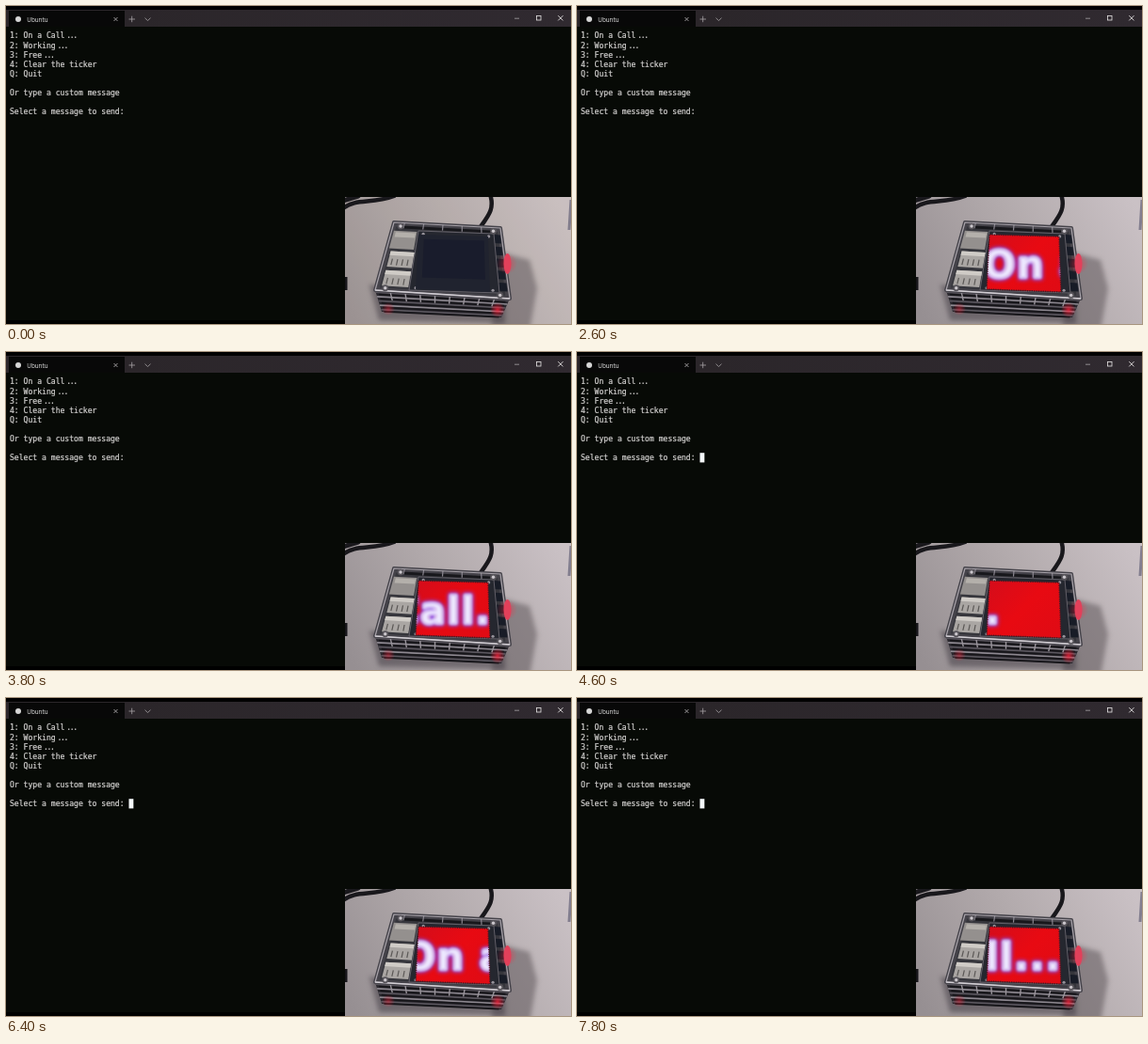
Animation of 600x338 px, one loop 8000 ms. Source, as an HTML page with a canvas:

```html
<!DOCTYPE html>
<html lang="en">
<head>
<meta charset="utf-8">
<title>Status ticker</title>
<style>
html, body { margin: 0; width: 100%; height: 100%; overflow: hidden; background: #000; }
canvas { display: block; width: 600px; height: 338px; }
</style>
</head>
<body>
<canvas id="stage" width="600" height="338"></canvas>
<script>
const ctx = document.getElementById('stage').getContext('2d');
const LOOP = 8000, STEP = 200;
const TYPED = 1400, SENT = 1800;
const LEFT = 4, CELL = 4.865, ROW = 10.13, BASE = 34.4;
const MENU = ['1: On a Call...', '2: Working...', '3: Free...', '4: Clear the ticker', 'Q: Quit',
  '', 'Or type a custom message', '', 'Select a message to send:'];
const TICKER = { text: 'On a Call...', from: 530, speed: 0.123, period: 3721, base: 288.5 };

const mix = (a, b, k) => a + (b - a) * k;

function rect(x, y, w, h, fill) {
  ctx.fillStyle = fill;
  ctx.fillRect(x, y, w, h);
}

function trace(points, close) {
  ctx.beginPath();
  points.forEach(p => ctx.lineTo(...p));
  if (close) ctx.closePath();
}

function poly(points, fill) {
  trace(points, true);
  ctx.fillStyle = fill;
  ctx.fill();
}

function stroke(points, color, width = 1, close = false) {
  trace(points, close);
  ctx.strokeStyle = color;
  ctx.lineWidth = width;
  ctx.stroke();
}

function disc([x, y], r, fill) {
  ctx.beginPath();
  ctx.arc(x, y, r, 0, 7);
  ctx.fillStyle = fill;
  ctx.fill();
}

function cross(x, y, r, color) {
  for (const s of [-1, 1]) stroke([[x - r, y - r * s], [x + r, y + r * s]], color, 0.9);
}

function blend(x0, y0, x1, y1, ...colors) {
  const g = ctx.createLinearGradient(x0, y0, x1, y1);
  colors.forEach((c, i) => g.addColorStop(i / (colors.length - 1), c));
  return g;
}

function glow(x, y, r, alpha) {
  const g = ctx.createRadialGradient(x, y, 0, x, y, r);
  g.addColorStop(0, `rgba(255,35,60,${alpha})`);
  g.addColorStop(1, 'rgba(255,35,60,0)');
  rect(x - r, y - r, 2 * r, 2 * r, g);
}

// a surface seen at an angle: u runs to the right, v towards the viewer
class Face {
  constructor(...corners) { this.corners = corners; }
  at(u, v) {
    const [a, b, c, d] = this.corners;
    return [0, 1].map(i => mix(mix(a[i], b[i], u), mix(d[i], c[i], u), v));
  }
  patch(u, v, w, h, fill) {
    poly([this.at(u, v), this.at(u + w, v), this.at(u + w, v + h), this.at(u, v + h)], fill);
  }
  line(u0, v0, u1, v1, color, width) {
    stroke([this.at(u0, v0), this.at(u1, v1)], color, width);
  }
  fill(color) { poly(this.corners, color); }
}

const lid = new Face([412, 230], [525, 236], [535, 311], [392, 302]);
const front = new Face([392, 302], [535, 311], [526, 331], [399, 325]);
const board = new Face([438, 239], [518, 242], [524, 305], [428, 302]);
const panel = new Face([438, 243], [512, 245], [514, 304], [435, 301]);

function drawWindow() {
  rect(0, 0, 600, 338, '#000');
  rect(0, 4, 600, 18, blend(126, 0, 600, 0, '#2b262a', '#302a30'));
  rect(0, 22, 600, 312, '#070a06');
  rect(3, 5, 123, 17, '#080808');
  disc([13, 14], 3, '#d6d6d6');
  ctx.font = '6.3px "Open Sans", sans-serif';
  ctx.fillStyle = '#f0f0f0';
  ctx.fillText('Ubuntu', 22.3, 16.6);

  const gray = '#a8a4a6', white = '#e6e4e4';
  cross(116.5, 14, 2, gray);
  stroke([[130.5, 14], [137, 14]], gray, 0.8);
  stroke([[133.7, 10.7], [133.7, 17.2]], gray, 0.8);
  stroke([[147.5, 12.7], [150.5, 15.5], [153.5, 12.7]], gray, 0.8);
  stroke([[540, 13.2], [545, 13.2]], gray, 0.8);
  ctx.strokeStyle = white;
  ctx.strokeRect(563.5, 10.5, 4.5, 4.5);
  cross(588.9, 12.8, 2.6, white);
}

function write(text, x, y) {
  ctx.strokeText(text, x, y);
  ctx.fillText(text, x, y);
}

function drawTerminal(t) {
  ctx.font = '8.08px "DejaVu Sans Mono", monospace';
  ctx.fillStyle = ctx.strokeStyle = '#d2d0cf';
  ctx.lineWidth = 0.22;
  MENU.forEach((text, row) => {
    const y = BASE + row * ROW;
    const word = text.replace('...', '');
    write(word, LEFT, y);
    if (word === text) return;
    // tight ellipsis, as a ligature sets it
    for (let i = -1; i <= 1; i++) write('.', LEFT + (word.length + 1.1) * CELL + i * 3.5, y);
  });

  const typed = t >= TYPED && t < SENT;
  const x = LEFT + 26 * CELL;
  if (typed) write('1', x, BASE + 8 * ROW);
  const blink = t < TYPED ? t >= 400 && t < 930 : (t + 60) % 1060 < 530;
  if (typed || blink) rect(x + (typed ? CELL : 0), 107.2, CELL, 10.2, '#f4f8fa');
}

function drawTable(lit) {
  rect(360, 203, 240, 135, blend(370, 335, 590, 205, '#968f92', '#b1a9ab', '#cac1c5'));
  if (!lit) rect(360, 203, 240, 135, 'rgba(190,175,150,.1)');
  stroke([[600, 206], [598, 238]], 'rgba(60,60,90,.5)', 3);

  ctx.filter = 'blur(2.5px)';
  poly([[526, 262], [556, 270], [564, 300], [556, 345], [515, 345]], 'rgba(88,80,84,.5)');
  poly([[386, 296], [396, 334], [530, 338], [530, 320]], 'rgba(60,55,62,.5)');
  ctx.filter = 'none';

  ctx.lineCap = 'round';
  ctx.beginPath();
  ctx.moveTo(358, 215);
  ctx.bezierCurveTo(372, 204, 388, 211, 412, 202);
  ctx.moveTo(514, 200);
  ctx.bezierCurveTo(519, 215, 513, 222, 503, 236);
  ctx.strokeStyle = '#19181c';
  ctx.lineWidth = 4.5;
  ctx.stroke();
  stroke([[358, 207], [374, 202]], '#19181c', 5);
  ctx.lineCap = 'butt';
  rect(360, 288, 2.5, 14, '#17161a');
}

function drawPort(v) {
  lid.patch(0.04, v, 0.2, 0.23, '#aaa6a3');
  lid.patch(0.04, v, 0.2, 0.06, '#cfcbc6');
  for (let i = 0; i < 4; i++) lid.line(0.07 + i * 0.043, v + 0.11, 0.07 + i * 0.043, v + 0.2, '#5b5856', 1.2);
}

function drawFront() {
  front.fill('#2a282e');
  for (let i = 0; i < 5; i++) {
    const v = 0.1 + i * 0.2;
    front.line(0, v, 1, v, i % 2 ? '#8d8890' : '#5c5860', 1.6);
    front.line(0.02, v + 0.09, 0.98, v + 0.09, '#17161a', 1.8);
  }
  for (let i = 1; i < 9; i++) front.line(i / 9, 0.05, i / 9, 0.45, '#99949b', 1.4);
}

function drawLid() {
  ctx.lineJoin = 'round';
  lid.fill('#45434a');
  stroke(lid.corners, '#45434a', 4, true);
  lid.patch(0.03, 0.06, 0.94, 0.9, '#36363c');
  lid.line(0.05, 0.06, 0.95, 0.06, '#18181c', 3);
  for (let i = 0; i < 5; i++) {
    lid.patch(0.93, 0.1 + i * 0.17, 0.06, 0.12, '#181c27');
    lid.line(0.1 + i * 0.18, 0, 0.1 + i * 0.18, 0.08, '#8b8790', 1.2);
  }
  stroke(lid.corners, '#a9a4ab', 1.2, true);
  lid.line(0, 1, 1, 1, '#d2ced4', 1.4);

  lid.patch(0.02, 0.12, 0.21, 0.26, '#94908e');
  lid.patch(0.04, 0.14, 0.18, 0.07, '#b4b0ab');
  drawPort(0.42);
  drawPort(0.7);
}

function drawBoard() {
  board.fill('#25272f');
  stroke(board.corners, '#716e77', 0.8, true);
  const corners = [0.07, 0.93].flatMap(u => [0.05, 0.96].map(v => [u, v]));
  for (const [u, v] of corners) {
    disc(lid.at(u, v), 3.4, '#57545a');
    disc(lid.at(u, v), 1.7, '#cbc7cc');
    disc(board.at(u, v), 1.6, '#96929a');
  }
}

function drawCase() {
  drawFront();
  drawLid();
  drawBoard();
  glow(532, 274, 11, 0.5);
  ctx.beginPath();
  ctx.ellipse(532.5, 274, 4, 11, 0, 0, 7);
  ctx.fillStyle = '#e2405a';
  ctx.fill();
  glow(522, 323, 8, 0.8);
  glow(406, 322, 7, 0.45);
}

function drawTicker(t) {
  const x = TICKER.from - TICKER.speed * ((t - SENT) % TICKER.period);
  ctx.font = 'bold 40px "DejaVu Sans", sans-serif';
  ctx.letterSpacing = '1.5px';
  ctx.filter = 'blur(2.2px)';
  ctx.strokeStyle = 'rgba(120,75,255,.85)';
  ctx.lineWidth = 5;
  ctx.strokeText(TICKER.text, x, TICKER.base);
  ctx.filter = 'blur(1.5px)';
  ctx.strokeStyle = ctx.fillStyle = '#ece8ff';
  ctx.lineWidth = 1.5;
  write(TICKER.text, x, TICKER.base);
}

function drawPanel(t) {
  if (t < SENT) {
    panel.fill('#20232f');
    panel.patch(0.08, 0.08, 0.86, 0.7, '#191c2c');
    return;
  }
  panel.fill(blend(440, 244, 505, 304, '#d60c1a', '#e80a12', '#e00b14'));
  ctx.save();
  trace(panel.corners, true);
  ctx.clip();
  drawTicker(t);
  ctx.restore();

  ctx.setLineDash([1.2, 1.2]);
  stroke(panel.corners, '#4a1822', 1.5, true);
  ctx.setLineDash([]);
}

function drawPhoto(t) {
  ctx.save();
  ctx.beginPath();
  ctx.rect(360, 203, 240, 135);
  ctx.clip();
  drawTable(t >= SENT);
  drawCase();
  drawPanel(t);
  ctx.restore();
}

const start = performance.now();
function frame() {
  const elapsed = (performance.now() - start) % LOOP;
  const t = Math.floor(elapsed / STEP) * STEP;
  drawWindow();
  drawTerminal(t);
  drawPhoto(t);
  requestAnimationFrame(frame);
}
frame();
</script>
</body>
</html>
```
